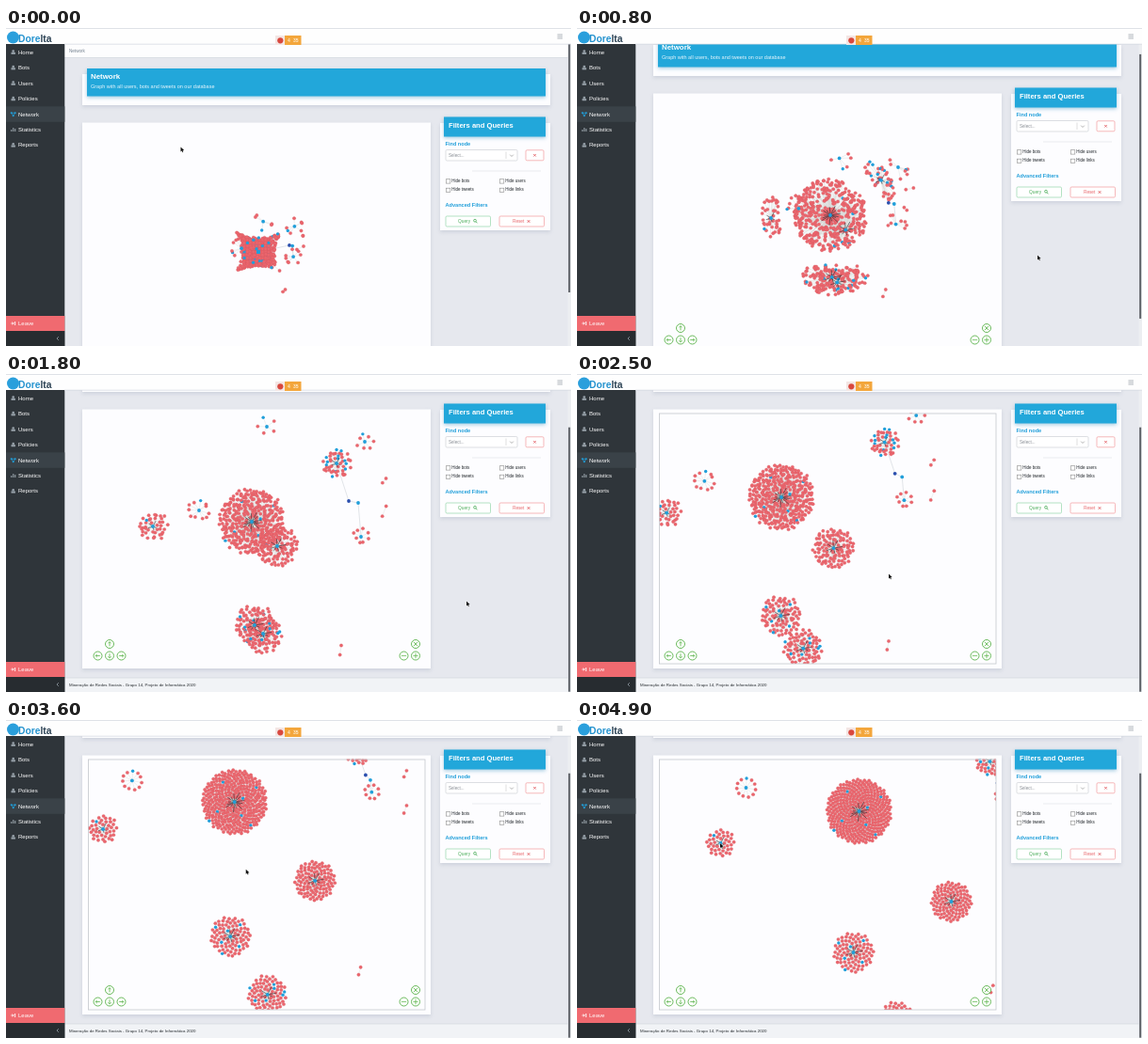
Write an HTML page with a canvas that moves like this. It is 600 px wide and 338 px high and loops after 5000 ms.

```html
<!DOCTYPE html>
<html lang="en">
<head>
<meta charset="utf-8">
<title>Network graph</title>
<style>
html, body { margin: 0; width: 100%; height: 100%; overflow: hidden; background: #e6e8ee; }
canvas { display: block; width: 600px; height: 338px; }
</style>
</head>
<body>
<canvas id="stage"></canvas>
<script>
const W = 600, H = 338, LOOP = 5000, STEP = 100, MAX_SCROLL = 63;
const BURST = 800, SETTLE = 1800, END = 4900, GOLDEN = 2.39996;
const RED = '#eb666d', BLUE = '#219fda', NAVY = '#2b4fae', INK = '#23282c';
const GREEN = '#4dae5c', PALE_GREEN = '#93d6aa', PALE_RED = '#f39a9d';
const FONT = '"Liberation Sans", Arial, sans-serif';

const canvas = document.getElementById('stage');
const ctx = canvas.getContext('2d');
const dpr = window.devicePixelRatio || 1;
canvas.width = W * dpr;
canvas.height = H * dpr;

let seed = 11;
const rnd = () => (seed = (seed * 16807) % 2147483647) / 2147483647;
const spread = () => rnd() * 2 - 1;
const mix = (a, b, p) => a + (b - a) * p;
const clamp = v => Math.max(0, Math.min(1, v));
const easeOut = p => 1 - (1 - p) * (1 - p);
const polar = (a, d) => [Math.cos(a) * d, Math.sin(a) * d];

// Position on a path of [time, x, y] stops.
function along(stops, t) {
  const i = Math.max(1, stops.findIndex(s => s[0] > t));
  const [a, b] = t >= stops.at(-1)[0] ? stops.slice(-2) : [stops[i - 1], stops[i]];
  const p = clamp((t - a[0]) / (b[0] - a[0]));
  return [mix(a[1], b[1], p), mix(a[2], b[2], p)];
}

/* ---------- graph model ---------- */

// Main hub as the view is panned; every group is placed relative to it.
const VIEW = [[0, 268, 175], [BURST, 269, 167], [SETTLE, 261, 157], [2500, 217, 131],
  [3000, 217, 77], [4100, 264, 95.5], [END, 299.5, 97]];
const POINTER = [[100, 185.5, 126.5], [600, 489, 241.5], [1900, 489, 241.5], [2400, 331, 212.5],
  [2500, 331, 212.5], [3000, 336, 165.5], [4100, 187, 153], [END, 152, 131]];

// near and far: offsets from the main hub when settled and at the end.
function group(n, r, near, far, { hole = 0.16, blues = 0, hub = BLUE } = {}) {
  const crowd = n > 12;
  const dist = Math.hypot(...near), dir = Math.atan2(near[1], near[0]);
  const nodes = Array.from({ length: n }, (_, i) => {
    const share = (i + 0.5) / n;
    return {
      start: crowd ? packed() : polar(rnd() * 7, r),
      burst: flung(r, crowd, dist, dir),
      rest: polar(crowd ? i * GOLDEN : i / n * Math.PI * 2 + 1.9, r * Math.sqrt(mix(hole * hole, 1, share))),
      wobble: [spread() * 2, spread() * 2],
      color: Math.floor(share * blues + 0.5) > Math.floor((share - 1 / n) * blues + 0.5) ? BLUE : RED
    };
  });
  return { nodes, r, near, far, hub, packed: crowd ? 0 : 0.32, spikes: crowd ? Math.round(Math.sqrt(n) * 0.8) : 0 };
}

// Start pose: a pillow-shaped square with a gridded core.
function packed() {
  const u = spread(), v = spread();
  if (rnd() < 0.5) return [Math.round(u * 4.6) * 3.2 - 2, Math.round(v * 4) * 3.2];
  return [u * 25 * (0.68 + 0.3 * v * v), v * 21 * (0.72 + 0.3 * u * u)];
}

// Mid-explosion pose: a disc at the hub, elsewhere an arc stretched across the flight direction.
function flung(r, crowd, dist, dir) {
  const a = rnd() * Math.PI * 2;
  if (!crowd) return polar(a, r * mix(0.6, 1.5, rnd()));
  if (dist < 40) {
    const d = rnd() < 0.2 ? rnd() * 0.25 : Math.sqrt(mix(0.1, 1, rnd()));
    const [x, y] = polar(a, d * 39);
    return [x - near0(dist), y - near0(dist)];
  }
  const [out, side] = polar(a, r * Math.sqrt(rnd()));
  const radial = out * 0.65 - side * side / dist, across = side * 1.65;
  return [Math.cos(dir) * radial - Math.sin(dir) * across, Math.sin(dir) * radial + Math.cos(dir) * across];
}
const near0 = dist => dist * 0.4;

const ring = { hole: 0.9, blues: 1 }, pair = { hole: 0.9, hub: null };
const chain = [
  group(46, 15, [90, -62], [139, -53], { hole: 0.3, blues: 12 }),
  group(0, 0, [103, -22], [147, -30], { hub: NAVY }),
  group(0, 0, [113, -20], [151, -24]),
  group(8, 8, [116, 16], [152, -16], { hole: 0.85 })
];
const groups = [
  group(370, 34.5, [0, 0], [0, 0], { hole: 0.1, blues: 7 }),
  group(112, 21.5, [27, 26], [98, 96]),
  group(90, 21.5, [3, 110], [-6, 150], { blues: 6 }),
  group(86, 20.5, [12, 119], [40, 223], { blues: 7 }),
  group(40, 15, [-105, 5], [-147, 34], { hole: 0.25, blues: 1 }),
  group(11, 10.5, [-56, -12], [-120, -25], ring),
  group(7, 8.5, [120, -85], [178, -90], ring),
  group(5, 9.5, [16, -101], [10, -130], ring),
  group(2, 4, [93, 137], [141, 189], pair),
  group(2, 4, [140, -44], [190, -27], pair),
  group(2, 4, [140, -11], [190, 12], pair),
  ...chain
];

function locate(g, t, hub) {
  const scale = t < BURST ? mix(g.packed, 0.6, easeOut(t / BURST))
    : mix(0.6, 1, easeOut(clamp((t - BURST) / (SETTLE - BURST))));
  const drift = easeOut(clamp((t - SETTLE) / (END - SETTLE)));
  return hub.map((h, k) => h + mix(g.near[k], g.far[k], drift) * scale);
}

function locateNode(n, origin, t) {
  const calm = Math.max(0.1, 1 - clamp((t - SETTLE) / 2400));
  return origin.map((o, k) => {
    const rest = n.rest[k] + n.wobble[k] * calm;
    return o + (t < BURST ? mix(n.start[k], n.burst[k], easeOut(t / BURST))
      : mix(n.burst[k], rest, easeOut(clamp((t - BURST) / (SETTLE - BURST)))));
  });
}

/* ---------- drawing helpers ---------- */

function box(x, y, w, h, fill, stroke, lw = 0.7) {
  if (fill) { ctx.fillStyle = fill; ctx.fillRect(x, y, w, h); }
  if (stroke) { ctx.strokeStyle = stroke; ctx.lineWidth = lw; ctx.strokeRect(x, y, w, h); }
}

function pill(x, y, w, h, stroke) {
  ctx.beginPath();
  ctx.roundRect(x, y, w, h, 1.2);
  ctx.fillStyle = '#fff';
  ctx.fill();
  ctx.strokeStyle = stroke;
  ctx.lineWidth = 0.7;
  ctx.stroke();
}

function raised(x, y, w, h, fill = '#fdfdff', shade = 'rgba(120,130,160,.22)') {
  ctx.save();
  ctx.shadowColor = shade;
  ctx.shadowBlur = 4 * dpr;
  ctx.shadowOffsetY = 1.5 * dpr;
  box(x, y, w, h, fill);
  ctx.restore();
}

const banner = (x, y, w, h) => raised(x, y, w, h, '#22a7da', 'rgba(32,130,180,.4)');

function dot(x, y, r, fill, stroke, lw = 0.8) {
  ctx.beginPath();
  ctx.arc(x, y, r, 0, Math.PI * 2);
  if (fill) { ctx.fillStyle = fill; ctx.fill(); }
  if (stroke) { ctx.strokeStyle = stroke; ctx.lineWidth = lw; ctx.stroke(); }
}

function lines(color, lw, ...segs) {
  ctx.beginPath();
  for (const [x1, y1, x2, y2] of segs) { ctx.moveTo(x1, y1); ctx.lineTo(x2, y2); }
  ctx.strokeStyle = color;
  ctx.lineWidth = lw;
  ctx.stroke();
}

const rule = (x, y, x2, color = '#d3d7de') => lines(color, 0.7, [x, y, x2, y]);
const cross = (x, y, r, color, lw = 0.9) =>
  lines(color, lw, [x - r, y - r, x + r, y + r], [x - r, y + r, x + r, y - r]);

// An angle bracket whose tip points along angle a.
function chevron(x, y, a, r, color, lw = 0.9) {
  lines(color, lw, ...[2.36, -2.36].map(turn => {
    const [dx, dy] = polar(a + turn, r);
    return [x, y, x + dx, y + dy];
  }));
}

function text(s, x, y, size, color, weight = '') {
  ctx.font = `${weight} ${size}px ${FONT}`;
  ctx.fillStyle = color;
  ctx.textBaseline = 'middle';
  ctx.fillText(s, x, y + 0.3);
  return x + ctx.measureText(s).width;
}

/* ---------- page ---------- */

function drawPage() {
  box(62, 17, 538, 14.5, '#fdfdfe');
  rule(62, 31.5, W);
  text('Network', 67, 24.5, 4.6, '#73818f');

  raised(81, 49, 497, 33);
  banner(86, 43, 487, 29.5);
  text('Network', 90, 52, 7.9, '#fff', 'bold');
  text('Graph with all users, bots and tweets on our database', 90, 62, 5.5, '#eaf7fd');

  raised(81, 100.5, 370, 275.5);
  raised(461, 101, 117, 114);
  banner(465, 94.5, 108, 21);
  text('Filters and Queries', 470, 104, 7.6, '#fff', 'bold');

  text('Find node', 466.5, 123.5, 5.6, BLUE, 'bold');
  pill(467, 129.5, 76, 11.5, '#ced1d6');
  text('Select...', 470, 135.3, 4.6, '#8a8f96');
  lines('#ccc', 0.6, [531, 131.5, 531, 139]);
  chevron(537, 136.5, Math.PI / 2, 2.6, '#aaa');
  pill(552, 129.8, 19, 11, PALE_RED);
  cross(561.5, 135.3, 1.2, '#e0565c');
  rule(495, 152, 568, '#e1e3e8');

  ['Hide bots', 'Hide users', 'Hide tweets', 'Hide links'].forEach((s, i) => {
    const x = 467 + i % 2 * 57, y = 163 + (i >> 1) * 9.5;
    box(x + 0.4, y - 2.3, 4.4, 4.4, '#fff', '#8c8c8c', 0.6);
    text(s, x + 6.2, y - 0.8, 4.5, INK);
  });

  text('Advanced Filters', 466.5, 188.5, 5.6, BLUE, 'bold');
  pill(467, 200, 47.5, 11, PALE_GREEN);
  text('Query', 480, 205.3, 4.8, GREEN);
  dot(498, 204.7, 1.4, null, GREEN);
  lines(GREEN, 0.9, [499, 205.8, 500.5, 207.3]);
  pill(524, 200, 47.5, 11, PALE_RED);
  text('Reset', 538, 205.3, 4.7, '#e8666b');
  cross(555, 205.5, 1.3, '#e0565c');

  box(62, 386, 538, 15, '#f1f3f6');
  rule(62, 386, W);
  text('Mineração de Redes Sociais - Grupo 14, Projeto de Informática 2020', 67, 393.3, 4.4, INK);
}

function menuIcon(name, x, y) {
  const gray = '#98a2aa';
  if (name === 'Network') {
    lines(BLUE, 0.7, [x - 2, y - 1.3, x + 2, y - 1.3], [x - 2, y - 1.3, x, y + 1.7], [x + 2, y - 1.3, x, y + 1.7]);
    [-2, 0, 2].forEach(d => dot(x + d, y + (d ? -1.3 : 1.7), 1, BLUE));
  } else if (name === 'Statistics') {
    [2, 4, 3].forEach((h, i) => box(x - 2.5 + i * 2, y + 2 - h, 1.1, h, gray));
  } else {
    dot(x, y - 1.2, 1.3, gray);
    box(x - 2.2, y, 4.4, 2.1, gray);
  }
}

function drawFrame(scroll) {
  box(0, 17, 62.3, 321, '#2f353a');
  box(0, 83.3, 62.3, 16.5, '#3a4248');
  ['Home', 'Bots', 'Users', 'Policies', 'Network', 'Statistics', 'Reports'].forEach((s, i) => {
    const y = 25.8 + i * 16.45;
    menuIcon(s, 7.7, y);
    text(s, 13, y, 6, '#fff');
  });
  box(0, 306, 62.3, 16, '#f06a70');
  lines('#fff', 0.9, [5.3, 314, 8, 314], [9.6, 312, 9.6, 316]);
  chevron(8.2, 314, 0, 2, '#fff');
  text('Leave', 13, 314, 6, '#fff');
  box(0, 322, 62.3, 16, '#272c30');
  chevron(54, 330, Math.PI, 2.6, '#8a939b');

  box(596.5, 17, 3.5, 321, '#eceef1');
  box(597.2, scroll * 0.9, 2, 281, '#5c6066');

  box(0, 0, W, 17, '#fefefe');
  rule(0, 0.5, W);
  rule(62, 17.2, W);
  dot(7.5, 10, 6.5, '#2a9fdc');
  text('lta', text('Dore', 13, 11.8, 10.3, '#2593cf', 'bold'), 11.8, 10.3, '#2c4254', 'bold');
  [7, 9, 11].forEach(y => rule(585.5, y, 591, '#8f979e'));

  box(286, 8, 10, 10, '#f3e6e4');
  dot(291.3, 13.3, 3.1, '#d9483f');
  box(296, 8, 17.5, 10, '#f3a63c');
  text('4', 299, 13, 5, '#fdebcf', 'bold');
  text('35', 305, 13, 5, '#fdebcf', 'bold');
}

/* ---------- graph ---------- */

function drawGraph(t) {
  const hub = along(VIEW, t);
  const posed = groups.map(g => {
    const at = locate(g, t, hub);
    return { ...g, at, pts: g.nodes.map(n => locateNode(n, at, t)) };
  });
  const joints = chain.map(g => locate(g, t, hub));
  lines('#cfd3d8', 0.6, ...joints.slice(1).map((p, i) => [...joints[i], ...p]));

  for (const g of posed)
    lines('#d6d9d6', 0.4, ...(g.hub ? g.pts.map(p => [...g.at, ...p]) : [g.pts.flat()]));
  for (const g of posed)
    g.pts.forEach(([x, y], i) => dot(x, y, 1.7, g.nodes[i].color, g.nodes[i].color === RED ? '#d75a63' : null, 0.3));
  for (const g of posed) {
    const reach = Math.min(g.r * 0.45, 11) * clamp(t / BURST);
    lines('#2a3136', 0.6, ...Array.from({ length: g.spikes }, (_, i) => {
      const [dx, dy] = polar(i * GOLDEN + 0.4, reach * (0.6 + 0.2 * (i % 3)));
      return [...g.at, g.at[0] + dx, g.at[1] + dy];
    }));
    if (g.hub) dot(...g.at, 1.9, g.hub);
  }
}

function drawControls() {
  const green = '#5cb34d';
  const button = (x, y) => dot(x, y, 4.5, '#fcfffb', green, 0.9);
  const arrow = (x, y, a) => {
    const [dx, dy] = polar(a, 2.3);
    button(x, y);
    lines(green, 0.8, [x - dx, y - dy, x + dx, y + dy]);
    chevron(x + dx, y + dy, a, 2.2, green, 0.8);
  };
  arrow(110, 287, -Math.PI / 2);
  [Math.PI, Math.PI / 2, 0].forEach((a, i) => arrow(97.5 + i * 12.5, 299.5, a));
  button(435, 287);
  cross(435, 287, 2.2, green, 0.8);
  [422.5, 435].forEach(x => {
    button(x, 299.5);
    rule(x - 2.6, 299.5, x + 2.6, green);
  });
  lines(green, 0.8, [435, 296.9, 435, 302.1]);
}

function drawCursor(t) {
  const [x, y] = along(POINTER, t);
  const arrow = new Path2D(`M${x} ${y}v5l1.2 -1l.8 1.8l.8 -.4l-.7 -1.7l1.6 -.1z`);
  ctx.strokeStyle = '#fff';
  ctx.lineWidth = 0.8;
  ctx.stroke(arrow);
  ctx.fillStyle = '#111';
  ctx.fill(arrow);
}

function render(t) {
  const scroll = Math.floor(MAX_SCROLL * clamp((t - 600) / 400));
  ctx.setTransform(dpr, 0, 0, dpr, 0, 0);
  box(0, 0, W, H, '#e6e8ee');

  ctx.save();
  ctx.translate(0, -scroll);
  drawPage();
  ctx.translate(0, MAX_SCROLL);
  ctx.save();
  ctx.beginPath();
  ctx.rect(87, 41.5, 358, 266.5);
  ctx.clip();
  drawGraph(t);
  ctx.restore();
  if (t >= 2200) box(87.5, 42, 357.5, 266, null, '#c4c7cc', 0.8);
  drawControls();
  ctx.restore();

  drawFrame(scroll);
  drawCursor(t);
}

const began = performance.now();
function tick() {
  const ms = (performance.now() - began) % LOOP;
  render(Math.floor(ms / STEP) * STEP);
  requestAnimationFrame(tick);
}
tick();
</script>
</body>
</html>
```
